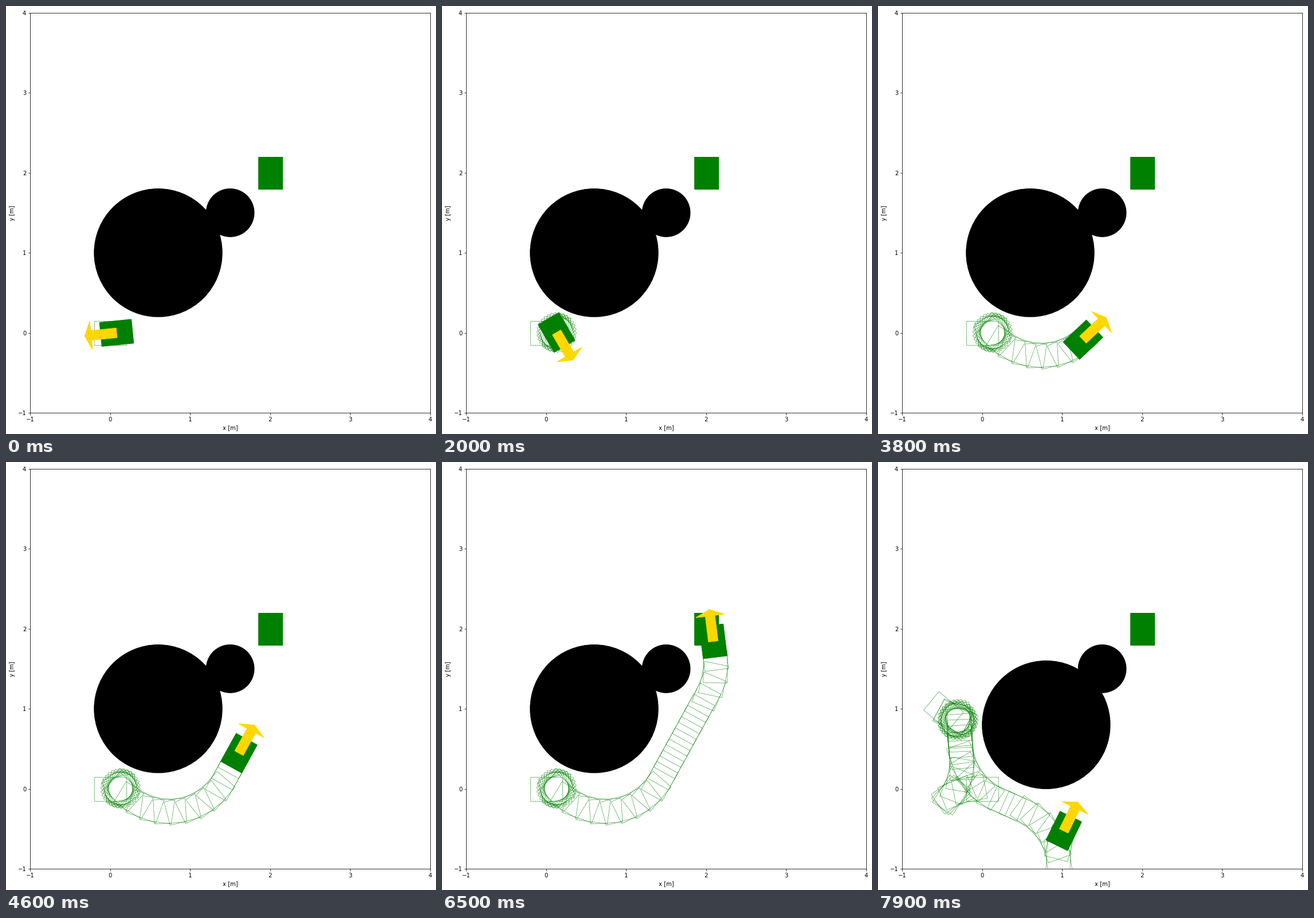
These frames come from a looping animation (750x746 px, 8 s). A matplotlib script:

```python
import numpy as np
import matplotlib.pyplot as plt
from matplotlib.animation import FuncAnimation
from matplotlib.patches import Arrow, Circle, Rectangle
from matplotlib.transforms import Affine2D

W, H, DPI = 750, 746, 72
FRAMES = 80
CUT = 66        # first frame of the second run
SKIPPED = 44    # frame number minus step number in the second run
DT = 0.1
MAX_YAW = 1.0
LENGTH, WIDTH = 0.4, 0.3


def drive(pose, *legs):
    """Poses of a robot that steers to a heading in (steps, speed, heading) legs."""
    x, y, a = pose
    poses = [pose]
    for steps, speed, heading in legs:
        for _ in range(steps):
            x += speed * np.cos(a) * DT
            y += speed * np.sin(a) * DT
            a += np.clip((heading - a) / DT, -MAX_YAW, MAX_YAW) * DT
            poses.append((x, y, a))
    return poses


# Back off, spin on the spot, go round the obstacle, bend up to the goal
first = drive((0, 0, np.pi),
              (1, -0.8, 7.35), (1, -0.5, 7.35), (21, 0, 7.35),
              (1, 0.6, 7.35), (33, 0.8, 7.35), (9, 0.8, 7.976))

# Start of the second run, seen only as a trail
past = drive((0, 0, 0),
             (5, -0.8, 1), (5, 0, 1), (14, 0.7, 1.65), (11, 0, 2.8),
             (3, 0.7, 2.43), (3, -0.7, 2.8), (20, 0, 4.8))

# Reverse in an S-bend, then pull forward
second = drive((-0.283, 0.869, 1.617),
               (4, -0.68, 1.617), (15, -0.8, 2.717),
               (11, -0.8, 1.117), (5, 0.8, 1.117))

plt.rcParams.update({"font.family": "DejaVu Sans", "font.size": 10})
fig = plt.figure(figsize=((W + 0.01) / DPI, (H + 0.01) / DPI), dpi=DPI,
                 facecolor="white")
SIDE = 697.62
ax = fig.add_axes([42.2 / W, 36.8 / H, SIDE / W, SIDE / H])
ax.set(xlim=(-1, 4), ylim=(-1, 4), xlabel="x [m]", ylabel="y [m]",
       xticks=range(-1, 5), yticks=range(-1, 5))


def put(patch, pose):
    x, y, a = pose
    patch.set_transform(Affine2D().rotate(a).translate(x, y) + ax.transData)


def box(pose, **style):
    patch = Rectangle((-LENGTH / 2, -WIDTH / 2), LENGTH, WIDTH, **style)
    put(patch, pose)
    return ax.add_patch(patch)


def outline(pose):
    return box(pose, fill=False, edgecolor="green", linewidth=0.5, zorder=2)


big = ax.add_patch(Circle((0.6, 1), 0.8, color="black"))
ax.add_patch(Circle((1.5, 1.5), 0.3, color="black"))
box((2, 2, np.pi / 2), color="green")

# Every second pose leaves an outline, shown from its step on
trails = [
    [(k, outline(first[k])) for k in range(0, len(first), 2)],
    [(0, outline(p)) for p in past[::2]]
    + [(k, outline(second[k])) for k in range(1, len(second), 2)],
]
body = box(first[0], color="green", zorder=3)
arrow = ax.add_patch(Arrow(0, 0, LENGTH, 0, width=0.6, color="gold", zorder=4))


def update(frame):
    run = int(frame >= CUT)
    step = frame - SKIPPED if run else frame + 1
    big.center = (0.8, 0.8) if run else (0.6, 1)
    for i, trail in enumerate(trails):
        for start, line in trail:
            line.set_visible(i == run and start <= step)
    for part in (body, arrow):
        put(part, (first, second)[run][step])
    return ax.patches


anim = FuncAnimation(fig, update, frames=FRAMES, interval=100,
                     init_func=lambda: update(0), repeat=True, repeat_delay=0)
plt.show()
```
